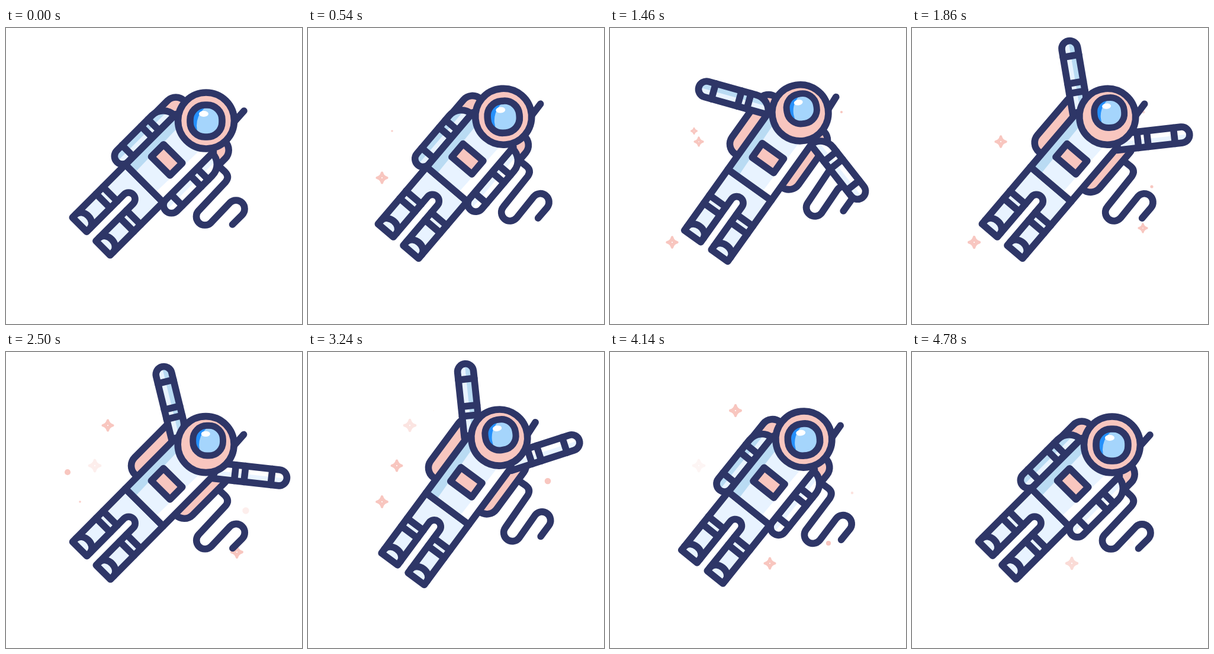
An HTML page that plays this animation: 500x500 px, repeating every 4800 ms.

```html
<!DOCTYPE html>
<html lang="en">
<head>
<meta charset="utf-8">
<title>Floating astronaut</title>
<style>
  html, body { margin: 0; width: 100%; height: 100%; overflow: hidden; background: #fff; }
  svg { display: block; width: 100%; height: 100%; }
  .line { stroke: #2e3667; stroke-width: 11.6; stroke-linecap: round; stroke-linejoin: round; fill: none; }
  .pink { fill: #f8c6bf; }
  .pale { fill: #e8f3ff; }
  .blue { fill: #b9dbf3; }
  .white { fill: #fff; }
  #stars { fill: #f8c6bf; stroke: #f8c6bf; stroke-width: 4; stroke-linejoin: round; }
  #stars circle { stroke: none; }
</style>
</head>
<body>
<svg viewBox="0 0 500 500">
  <defs>
    <clipPath id="glass"><rect x="311" y="130" width="54" height="54" rx="25"/></clipPath>
    <path id="limb" d="M-45 -97A27 27 0 0 0 -72 -70V14A13.5 13.5 0 0 0 -45 14Z"/>
    <path id="outer" d="M-45 -97A27 27 0 0 0 -72 -70V14A13.5 13.5 0 0 0 -58.5 27.5V-90Z"/>
    <path id="cuffs" d="M-72 1.5H-45M-72 -44H-45M-72 -60.5H-45"/>
    <path id="leg" d="M-45 74H-11M-45 90.5H-11M-45 139C-43 122 -13 122 -11 139"/>
  </defs>
  <g id="stars"></g>
  <g id="all">
    <path class="line" d="M356 230L370 243Q378 251 371 260L325.7 308.2A14.5 14.5 0 0 0 346.3 328.8L378.2 295.2A14.3 14.3 0 0 1 398.8 315.8L382.5 332"/>
    <path class="line" d="M386 158L402 140"/>
    <g transform="translate(250 250) rotate(45) translate(-2.8 0)">
      <rect class="pink" x="-71" y="-126" width="138" height="118" rx="20"/>
      <rect class="line" x="-71" y="-126" width="138" height="118" rx="20"/>
      <g id="armL">
        <use href="#limb" class="pale"/>
        <use href="#outer" class="blue"/>
        <use href="#limb" class="line"/>
        <use href="#cuffs" class="line"/>
      </g>
      <g transform="scale(-1 1)">
        <g id="armR">
          <use href="#limb" class="pale"/>
          <use href="#outer" class="white"/>
          <use href="#limb" class="line"/>
          <use href="#cuffs" class="line"/>
        </g>
      </g>
      <path class="line" style="fill:#e8f3ff" d="M-45 20.5V147H-11V58A11 11 0 0 1 11 58V147H45V20.5Z"/>
      <use href="#leg" class="line"/>
      <use href="#leg" class="line" x="56"/>
      <path class="white" d="M-45 -100H45V20.5H-45Z"/>
      <path class="pale" d="M-45 -100H27L24 20.5H-45Z"/>
      <path class="blue" d="M-45 -100H-27L-24 20.5H-45Z"/>
      <path class="line" d="M-45 -100H45V20.5H-45Z"/>
      <rect class="line" style="fill:#f8c6bf" x="-23.4" y="-49.2" width="44.6" height="29.4"/>
    </g>
    <circle class="line" style="fill:#f8c6bf" cx="338" cy="156.5" r="47.5"/>
    <g id="visor">
      <g clip-path="url(#glass)">
        <rect x="308" y="127" width="60" height="60" fill="#2590fb"/>
        <circle cx="362" cy="165" r="40" fill="#a5d5fc"/>
        <ellipse cx="334" cy="145" rx="8" ry="5" class="white"/>
      </g>
      <rect class="line" x="311" y="130" width="54" height="54" rx="25"/>
    </g>
  </g>
</svg>
<script>
const LOOP = 4800, SWAY = 1200;
const $ = id => document.getElementById(id);
const place = (el, transform) => el.setAttribute("transform", transform);

// Eased 0..1 between two times.
function ramp(t, from, to) {
  const x = Math.min(1, Math.max(0, (t - from) / (to - from)));
  return x * x * (3 - 2 * x);
}

// Eased swing 0 -> 1 -> 0, two SWAY steps long.
function swing(t) {
  const x = t % (2 * SWAY);
  return ramp(x, 0, SWAY) - ramp(x, SWAY, 2 * SWAY);
}

// Sparkles and dots each light up in list order, at an even pace.
const SPARKS = [
  [125, 253], [142, 174, 0.55], [105, 362], [150, 192], [390, 338],
  [172, 124], [125, 253], [150, 192], [212, 99], [270, 357]
];
const DOTS = [[181, 125], [391, 142, 0.4], [405, 268], [104, 203], [405, 218], [409, 238, 0.4], [369, 323]];
const STAR = '<path d="M0 -8Q1.6 -1.6 8 0Q1.6 1.6 0 8Q-1.6 1.6 -8 0Q-1.6 -1.6 0 -8Z"/><circle r="1" fill="#fff"/>';
const DOT = '<circle r="5"/>';

function scatter(points, shape, first, gap, life) {
  return points.map(([x, y, size = 1], i) => {
    const el = document.createElementNS("http://www.w3.org/2000/svg", "g");
    el.innerHTML = shape;
    $("stars").append(el);
    return { el, x, y, size, life, birth: first + i * gap };
  });
}
const twinkles = [...scatter(SPARKS, STAR, 0, 400, 1400), ...scatter(DOTS, DOT, 640, 560, 800)];

function moveArm(id, angle, lift) {
  place($(id), `translate(0 ${-lift}) rotate(${angle} -48 -94)`);
}

function draw(t) {
  const sway = swing(t);
  const raise = ramp(t, 1200, 1720) - ramp(t, 3600, 4040);
  const look = ramp(t, 920, 1400) - ramp(t, 3060, 3560);
  const arm = raise * (121 + 21 * sway);

  place($("all"), `rotate(${-10.8 * sway} 250 250)`);
  moveArm("armL", arm, 3 * raise);
  moveArm("armR", arm + 7 * raise, 6 * raise);
  place($("visor"), `translate(${338 + 3.5 * look} ${157 - 7 * look}) scale(${1 - 0.06 * look}) translate(-338 -157)`);

  for (const { el, x, y, size, life, birth } of twinkles) {
    const p = (t - birth) / life;
    const on = p > 0 && p < 1;
    place(el, `translate(${x} ${y}) scale(${on ? size * ramp(p, 0, 0.25) * (1 + 0.15 * p) : 0})`);
    el.setAttribute("opacity", on ? Math.min(1, (1 - p) * 4) : 0);
  }
}

const start = performance.now();
function tick() {
  draw((performance.now() - start) % LOOP);
  requestAnimationFrame(tick);
}
tick();
</script>
</body>
</html>
```
